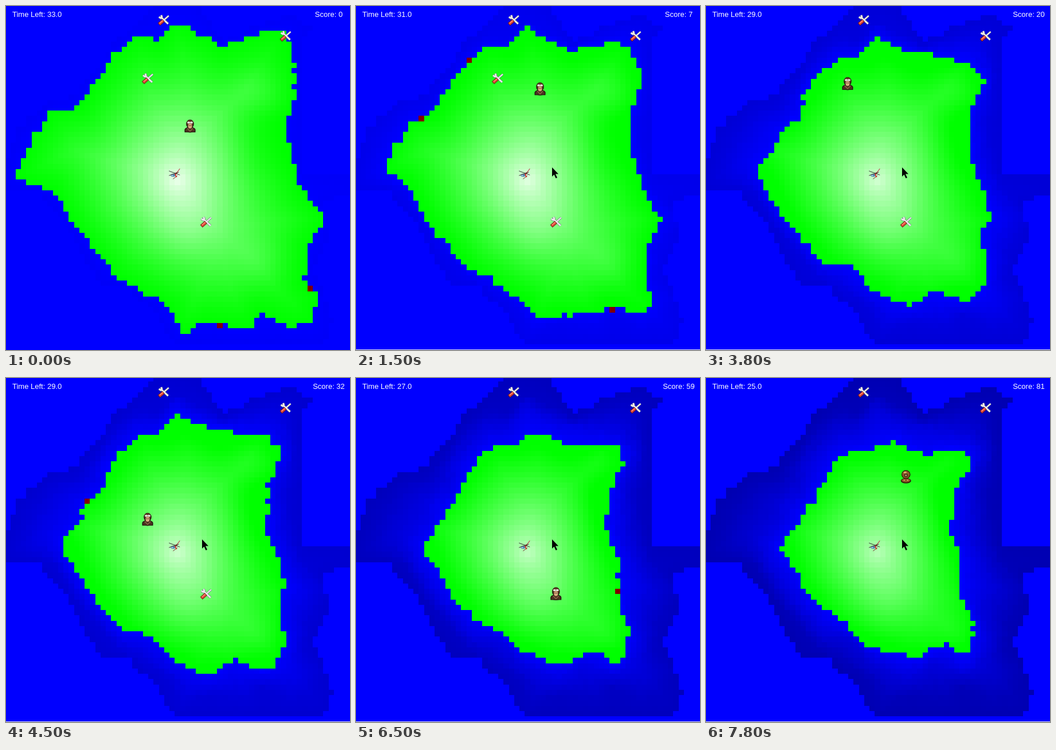
An HTML page with a canvas for the animation above (8 s loop, 600x599 px).

```html
<!DOCTYPE html>
<html>
<head>
<meta charset="utf-8">
<style>
html, body { margin: 0; width: 100%; height: 100%; overflow: hidden; background: #00f; }
canvas { display: block; }
</style>
</head>
<body>
<canvas id="stage" width="600" height="599"></canvas>
<script>
const ctx = document.getElementById('stage').getContext('2d');
const PITCH = 9.25, CELLS = 66, LOOP = 8000;
const px = c => Math.round(c * PITCH - 1.6);
const py = r => Math.round(r * PITCH - 3);

// Key corners of the coast, in cells, at a few heights of the tide; t in seconds.
const shores = [
  { t: -0.8, coast: '29,0 36,0 41,7 47,4 54,2 58,5 56,7 56,32 66,32 66,36 60,37 61,44 58,50 62,60 60,64 32,64 29,59 23,53 18,53 12,42 6,35 0,35 0,31 2,24 8,18.5 13,17 22,6' },
  { t: 0, coast: '32,3 34,4 41,8 49,5 53,5 54.5,12 54.5,18 53,22 54,29 56,35 61,40 57,46 56.5,52 59,55 58,60 54,61 48,58 46,61 38,60 33,62 31,57 21,51 14,43 9,35 2,32.5 5,25 9,20 14,19 20,10 25,6 29,7' },
  { t: 3.8, coast: '32,6 38,9 46,10 50,11 53,14 50,20 50,29 54,40 52,43 53.5,50 52,54 49,56 43,54 38,57 32,54 27,49 22,48.5 17,43 12,36 10,31 14,26 14,24 18,21 19,16 22,13 25,10.5 29,10' },
  { t: 7.8, coast: '36,12 41,15 46,14 49,14 50,17 48,20 46,28 48,34 48,41 51,48 49,53 45,50 41,53 37,52.5 31,51 26,46 20,42 17,36 14,32.5 18,27 23,19 25,15 30,14' }
].map(({ t, coast }) => {
  const points = coast.split(' ').map(p => p.split(',').map(Number));
  return { t, points, path: new Path2D('M' + coast + 'Z') };
});

function hash(c, r, salt) {
  const s = Math.sin(c * 12.9898 + r * 78.233 + salt * 37.719) * 43758.5453;
  return s - Math.floor(s);
}

function segmentDistance(x, y, [ax, ay], [bx, by]) {
  const dx = bx - ax, dy = by - ay;
  const k = Math.max(0, Math.min(1, ((x - ax) * dx + (y - ay) * dy) / (dx * dx + dy * dy)));
  return Math.hypot(x - ax - k * dx, y - ay - k * dy);
}

const shoreDistance = (x, y, { points }) =>
  Math.min(...points.map((p, i) => segmentDistance(x, y, p, points[(i + 1) % points.length])));

// The tide moves evenly from each coast to the next; null is open sea.
function floodTime(x, y) {
  let k = shores.length - 1;
  while (k >= 0 && !ctx.isPointInPath(shores[k].path, x, y)) k--;
  if (k < 0) return null;
  if (k === shores.length - 1) return Infinity;
  const outer = shores[k], inner = shores[k + 1];
  const a = shoreDistance(x, y, outer), b = shoreDistance(x, y, inner);
  return outer.t + (inner.t - outer.t) * a / (a + b);
}

const bump = (x, y, cx, cy, sx, sy) => Math.exp(-(((x - cx) / sx) ** 2) - (((y - cy) / sy) ** 2));

// Height of the land: a peak that falls to the coast, with two side hills and a hollow.
function paleness(x, y) {
  const r = Math.hypot(x - 32.4, y - 33);
  const s = shoreDistance(x, y, shores[1]);
  return 235 * (s / (r + s)) ** 1.35
    - 20 * bump(x, y, 46.5, 26, 5, 9)
    + 25 * bump(x, y, 47.5, 16.5, 5, 4)
    + 25 * bump(x, y, 47.5, 48, 5, 5)
    + 25 * bump(x, y, 34, 42, 5, 6);
}

const cells = [];
for (let r = 0; r < CELLS; r++) {
  for (let c = 0; c < CELLS; c++) {
    const x = c + 0.5, y = r + 0.5;
    const rough = salt => (hash(c, r, salt) - 0.5) * 0.6;
    const flooded = floodTime(x + rough(1), y + rough(2));
    if (flooded !== null) cells.push({ c, r, flooded, pale: paleness(x, y), spot: hash(c, r, 3) < 0.07 });
  }
}

// Every step of the walk scores one point.
const moves = { U: [0, -1], D: [0, 1], L: [-1, 0], R: [1, 0] };
const walk = [[34, 22]];
for (const leg of 'U7 L6 U3 L2 D2 D23 R5 D4 R6 U1 U22'.split(' ')) {
  const [dx, dy] = moves[leg[0]];
  for (let n = +leg.slice(1); n > 0; n--) {
    const [x, y] = walk[walk.length - 1];
    walk.push([x + dx, y + dy]);
  }
}
const pace = [[0, 0], [1.5, 7], [2.8, 16], [3.8, 20], [5.5, 48], [6.5, 59], [7.8, 81]];

function stepsAt(t) {
  const i = Math.max(1, pace.findIndex(([end]) => t <= end));
  const [t0, s0] = pace[i - 1], [t1, s1] = pace[i];
  return Math.round(s0 + (s1 - s0) * (t - t0) / (t1 - t0));
}

// A tool is gone once the walk has reached its cell.
const tools = [[29, 2], [52, 5], [26, 13], [37, 40]].map(([c, r]) => {
  const step = walk.findIndex(([x, y]) => x === c && y === r);
  return { c, r, taken: step < 0 ? Infinity : step };
});
const lastTool = tools[3].taken;

function fillCell(c, r, color) {
  box(color, px(c), py(r), px(c + 1) - px(c), py(r + 1) - py(r));
}

function at(c, r, draw) {
  ctx.save();
  ctx.translate(c * PITCH + 6.5, r * PITCH + 5.5);
  draw();
  ctx.restore();
}

function line(color, width, ...p) {
  ctx.strokeStyle = color;
  ctx.lineWidth = width;
  ctx.beginPath();
  for (let i = 0; i < p.length; i += 2) ctx.lineTo(p[i], p[i + 1]);
  ctx.stroke();
}

function oval(color, x, y, rx, ry) {
  ctx.fillStyle = color;
  ctx.beginPath();
  ctx.ellipse(x, y, rx, ry, 0, 0, 7);
  ctx.fill();
}

function box(color, x, y, w, h) {
  ctx.fillStyle = color;
  ctx.fillRect(x, y, w, h);
}

function tool() {
  for (const [color, extra] of [['#778', 1.4], ['#eee', 0]]) {
    line(color, 2.6 + extra, -4, -4, 8, 7);
    line(color, 2.6 + extra, -8, -5, -5, -3, -3, -5, -4, -8);
    line(color, 2 + extra, 0, 1, 9, -7);
  }
  line('#611', 6, -8, 8, 0, 1);
  line('#d43', 4.4, -7.5, 7.5, -0.5, 1.5);
  line('#f98', 1.2, -7, 6, -1, 1);
}

function pilot() {
  oval('#21160e', 0, 6.5, 9.5, 5);
  box('#21160e', -9.5, 6.5, 19, 4.5);
  oval('#4c3020', 0, 6.5, 8, 4);
  box('#4c3020', -8, 7, 16, 3);
  line('#8a6b45', 1.4, -5, 4, 0, 9, 5, 4);
  oval('#2b1a10', 0, -3.5, 6.8, 7.8);
  oval('#5e3a22', 0, -5, 5.4, 5.5);
  oval('#d9a87c', 0, 0, 3.6, 4.2);
  oval('#e8e8e0', -2.4, -6, 2.6, 1.7);
  oval('#e8e8e0', 2.4, -6, 2.6, 1.7);
  box('#3a2416', -2.5, -1.5, 2, 1);
  box('#3a2416', 0.5, -1.5, 2, 1);
}

function diver() {
  oval('#2c1707', 0, 7, 9, 4.5);
  oval('#8a5526', 0, 6.5, 7.5, 3.3);
  oval('#2c1707', 0, -4, 7.8, 7.5);
  oval('#8f5a2a', 0, -4, 6.5, 6.3);
  oval('#d9a868', -1.5, -7.5, 2.8, 1.8);
  oval('#4a2a10', 0, -2.5, 3.6, 3);
  oval('#a08a6c', 0, -2.5, 2, 1.6);
  box('#d9a868', -4, 5, 2, 2);
  box('#d9a868', 2, 5, 2, 2);
}

function helicopter() {
  line('#733', 1, -2, 9, 6, 3);
  line('#c33', 2.4, -1, 3, 5, -2);
  line('#b44', 1.2, 4, -1, 10, -9);
  oval('#58a', -2, 2.5, 4, 2.6);
  oval('#9ce', -3.5, 2.5, 1.6, 1.5);
  line('#333', 1, -9, -5, 10, 2);
  line('#333', 1, -9, 3, 8, -3);
  line('#d22', 1.6, 2, 1, 4, 6);
}

function cursor() {
  ctx.fillStyle = '#000';
  ctx.fill(new Path2D('M342 281v16l3.5-3.5 3 6.5 2.5-1-3-6.5h5z'));
}

function text(string, x, align) {
  ctx.fillStyle = '#fff';
  ctx.font = '13px "Liberation Sans", Arial, sans-serif';
  ctx.textAlign = align;
  ctx.fillText(string, x, 19);
}

function landColor(pale, t) {
  const v = Math.max(0, Math.round(pale - 6.5 * t));
  return `rgb(${v},255,${v})`;
}

function render(t) {
  const steps = stepsAt(t);
  box('#00f', 0, 0, 600, 599);
  for (const { c, r, flooded, pale, spot } of cells) {
    if (flooded < t || flooded < 0) fillCell(c, r, `rgb(0,0,${Math.round(255 - 9 * (t - flooded))})`);
    else if (spot && flooded < t + 0.1) fillCell(c, r, '#800000');
    else fillCell(c, r, landColor(pale, t));
  }
  if (t > 0) box('#dde', 0, 598, 600, 1);

  for (const { c, r, taken } of tools) if (steps < taken) at(c, r, tool);
  at(31, 31, helicopter);
  at(...walk[steps], steps > lastTool ? diver : pilot);
  if (t >= 0.5) cursor();

  text(`Time Left: ${Math.ceil(32.35 - 0.95 * t).toFixed(1)}`, 11, 'left');
  text(`Score: ${steps}`, 563, 'center');
}

// The game redraws twice every half second.
let shown = -1;
function tick() {
  const ms = performance.now() % LOOP;
  const half = Math.floor(ms / 500) * 500;
  const state = ms - half >= 300 ? half + 300 : half;
  if (state !== shown) render((shown = state) / 1000);
  requestAnimationFrame(tick);
}
tick();
</script>
</body>
</html>
```
